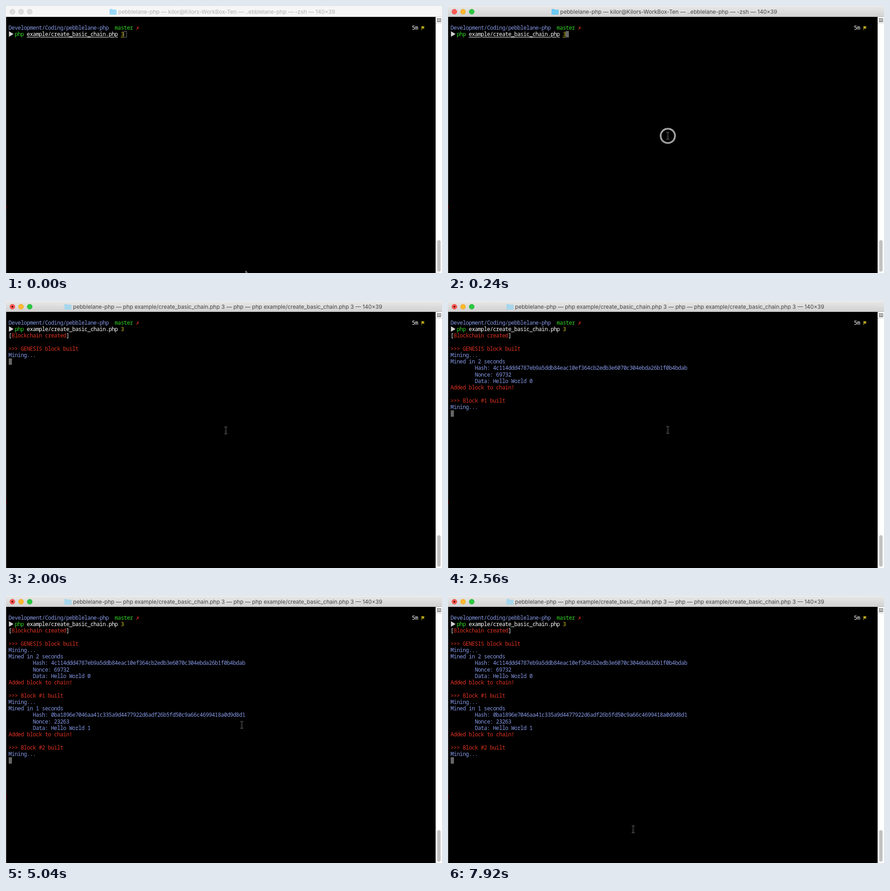
Write an HTML page that moves like this. It is 956 px wide and 586 px high and loops after 8000 ms.

```html
<!DOCTYPE html>
<html lang="en">
<head>
<meta charset="utf-8">
<title>Terminal</title>
<style>
html, body { margin: 0; width: 100%; height: 100%; overflow: hidden; background: #000; }
#stage { position: relative; width: 956px; height: 586px; overflow: hidden; background: #000; }
svg { position: absolute; left: 0; top: 0; }
#bar { position: absolute; width: 956px; height: 23px; background: linear-gradient(#f2f2f2, #e6e6e6 2px, #d2d2d2); border-bottom: 1px solid #b4b4b4; box-sizing: border-box; height: 24px; }
#bar.idle { background: #f6f6f6; border-color: #d8d8d8; }
#title { position: absolute; top: 1px; white-space: pre; color: #444; font: 12.1px/24px Inter, "Open Sans", sans-serif; }
.idle #title { color: #b2b2b2; }
.light { stroke-width: .7; }
.idle .light { fill: #dcdcdc; stroke: #c3c3c3; }
#screen { position: absolute; left: 5.6px; top: 40.5px; margin: 0; white-space: pre; color: #fff; font: 500 12px/14.25px "Noto Sans Mono", "DejaVu Sans Mono", monospace; letter-spacing: -.55px; }
.b { color: #8699e6; } .r { color: #e0321f; } .g { color: #32d724; } .y { color: #cec21e; }
.raw u { text-decoration: underline; text-underline-offset: 2px; text-decoration-thickness: 1px; }
u { text-decoration: none; }
#caret { position: absolute; width: 7px; height: 14px; box-sizing: border-box; background: #666; }
#caret.idle { background: none; border: 1px solid #707070; }
</style>
</head>
<body>
<div id="stage">
  <div id="bar">
    <svg width="956" height="23">
      <circle class="light" cx="14" cy="12.5" r="5.6" fill="#fc5b53" stroke="#df4540"/>
      <circle class="light" cx="33" cy="12.5" r="5.6" fill="#fdb92c" stroke="#dea032"/>
      <circle class="light" cx="52" cy="12.5" r="5.6" fill="#29c940" stroke="#27aa35"/>
      <circle id="dirty" cx="14" cy="12.5" r="2" fill="#5e0703"/>
      <path id="folder" d="M0 2q0-1.500 1.500-1.500h4l1.500 1.500h7q1.500 0 1.500 1.500v8q0 1.500-1.500 1.500h-12.500q-1.500 0-1.500-1.500z"/>
    </svg>
    <div id="title"></div>
  </div>
  <pre id="screen"></pre>
  <div id="caret"></div>
  <svg width="956" height="586">
    <path d="M6.500 55.500v12l10-6z" fill="#d2d2d2"/>
    <path d="M911.500 44v9" stroke="#b9a91d"/>
    <path d="M911 44.500h7l-2 2.500 2 2.500h-7z" fill="#b9a91d"/>
    <path d="M0.500 24v562" stroke="#555"/>
    <path d="M0.500 437v8" stroke="#a3262e"/>
    <rect x="942" y="24" width="14" height="562" fill="#fff"/>
    <path d="M942 37.500h14" stroke="#ccc"/>
    <rect x="945.500" y="27.500" width="8" height="7" fill="#eee" stroke="#555"/>
    <path d="M947 29.500h5M947 31.500h5M947 33.500h5" stroke="#777"/>
    <rect x="945.500" y="514" width="7.500" height="69" rx="3.750" fill="#c2c2c2"/>
    <path id="arrow" d="M526 581.500v12l3-3h4z" fill="#000" stroke="#ddd"/>
    <g id="beam" fill="none">
      <path id="beamPath" d="M-3-7.500q3 0 3 2.500v10q0 2.500-3 2.500M3-7.500q-3 0-3 2.500v10q0 2.500 3 2.500M-2 2h4" stroke="#606060" stroke-width="2.600"/>
      <path d="M-3-7.500q3 0 3 2.500v10q0 2.500-3 2.500M3-7.500q-3 0-3 2.500v10q0 2.500 3 2.500M-2 2h4" stroke="#111" stroke-width=".9"/>
      <g id="ring" stroke="#eee" stroke-width="1.300">
        <circle r="16.700"/><circle r="14.700"/>
      </g>
    </g>
  </svg>
</div>
<script>
const LOOP = 8000, LINE = 14.25, CELL = 6.65;
const $ = id => document.getElementById(id);
const span = (cls, text) => `<span class="${cls}">${text}</span>`;
const command = 'example/create_basic_chain.php';
const project = 'pebblelane-php';

const prompt = [
  span('b', `Development/Coding/${project}`) + '  ' + span('g', 'master') + ' ' + span('r', '✗') + ' '.repeat(90) + '5m',
  '  ' + span('g', 'php') + ` <u>${command}</u> ` + span('y', '<u>3</u>')
];
const start = name => ['', span('r', `&gt;&gt;&gt; ${name} built`), span('b', 'Mining...')];
const mined = (n, secs, hash, nonce) => [
  `Mined in ${secs} seconds`, `        Hash: ${hash}`, `        Nonce: ${nonce}`, `        Data: Hello World ${n}`
].map(s => span('b', s)).concat(span('r', 'Added block to chain!'));

// Each chunk of output is printed at its own moment
const output = [
  [0, prompt],
  [1120, ['[' + span('r', 'Blockchain created') + ']', ...start('GENESIS block')]],
  [2560, [...mined(0, 2, '4c114ddd4787eb9a5ddb84eac10ef364cb2edb3e6070c304ebda26b1f0b4bdab', 69732), ...start('Block #1')]],
  [3040, [...mined(1, 1, '0ba1896e7046aa41c335a9d4477922d6adf26b5fd50c9a66c4699418a0d9d8d1', 23263), ...start('Block #2')]]
];

// Pointer positions: time, x, y
const path = [
  [80, 506, 440], [160, 486, 310], [240, 482, 285], [2000, 482, 284], [2080, 482, 283],
  [3280, 484, 282], [3360, 486, 281], [4800, 517, 290], [5040, 517, 283], [5120, 516, 277],
  [6560, 513, 297], [6640, 474, 390], [6720, 428, 470], [6800, 403, 507], [6960, 404, 508],
  [7760, 405, 509], [7840, 406, 511], [7920, 406, 512]
];

const show = (id, on) => $(id).style.display = on ? '' : 'none';
let shown = '';

function draw(t) {
  const idle = t < 240, running = t >= 1040;
  const lines = output.filter(([at]) => t >= at).flatMap(([, text]) => text);
  const html = lines.join('\n');
  if (html !== shown) $('screen').innerHTML = shown = html;
  $('screen').className = t < 1120 ? 'raw' : '';

  $('bar').className = $('caret').className = idle ? 'idle' : '';
  const left = running ? 147 : 246;
  $('title').style.left = left + 'px';
  $('title').textContent = running
    ? `${project} — php ${command} 3 — php — php ${command} 3 — 140×39`
    : `${project} — kilor@Kilors-WorkBox-Ten — ..ebblelane-php — -zsh — 140×39`;
  $('folder').setAttribute('transform', `translate(${left - 19} 6)`);
  $('folder').setAttribute('fill', running ? '#a6d7ec' : idle ? '#98d7f8' : '#6cc8f5');
  show('dirty', running);

  const [col, row] = running ? [0, lines.length] : [38, 1];
  $('caret').style.left = 5.5 + col * CELL + 'px';
  $('caret').style.top = 40.5 + row * LINE + 'px';

  const spot = path.filter(([at]) => t >= at).pop();
  show('arrow', !spot);
  show('beam', spot);
  show('ring', t >= 240 && t < 400);
  if (spot) $('beam').setAttribute('transform', `translate(${spot[1]} ${spot[2]})`);
}

function tick() {
  draw(performance.now() % LOOP);
  requestAnimationFrame(tick);
}
tick();
</script>
</body>
</html>
```
